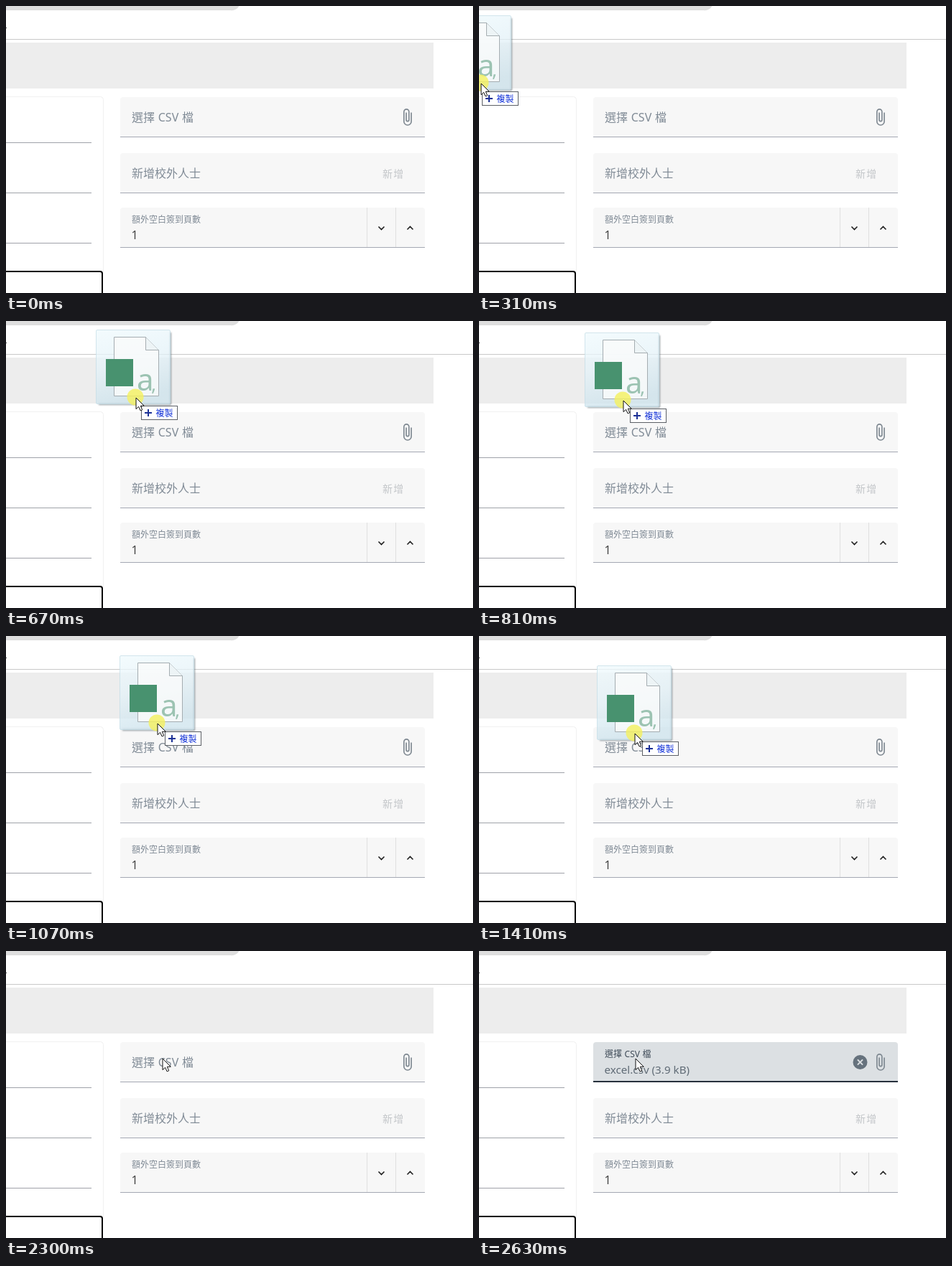
Recreate the animation shown at these times as an HTML page. Size 650 by 400 pixels, loop 3.05 s.

```html
<!DOCTYPE html>
<html lang="zh-Hant">
<head>
<meta charset="utf-8">
<title>CSV upload</title>
<style>
html, body { margin: 0; width: 100%; height: 100%; overflow: hidden; background: #fff; }
svg { display: block; width: 650px; height: 400px; }
text { font: 16px "Noto Sans", "Noto Sans CJK TC", "Noto Sans CJK", sans-serif; fill: #808b96; }
.small { font-size: 12px; }
.crisp { shape-rendering: crispEdges; }
</style>
</head>
<body>
<svg viewBox="0 0 650 400" xmlns="http://www.w3.org/2000/svg">
  <defs>
    <linearGradient id="tint" x1="0" y1="0" x2=".25" y2="1">
      <stop offset="0" stop-color="#f0fafd" stop-opacity=".78"/>
      <stop offset=".5" stop-color="#e4f2f8" stop-opacity=".75"/>
      <stop offset="1" stop-color="#cbe2ec" stop-opacity=".72"/>
    </linearGradient>
    <filter id="shade" x="-10%" y="-10%" width="125%" height="125%">
      <feGaussianBlur stdDeviation=".8"/>
    </filter>
    <path id="box" d="M0 56V4A4 4 0 0 1 4 0H420A4 4 0 0 1 424 4V56Z"/>
    <rect id="line" class="crisp" width="424" height="1" fill="#a4a8b3"/>
    <rect id="rule" class="crisp" width="119" height="1" fill="#9fa2a9"/>
  </defs>

  <!-- page -->
  <path d="M0 0H324.5A12.5 12.5 0 0 1 312 6H0Z" fill="#dedede"/>
  <rect class="crisp" y="30" width="1" height="1" fill="#333"/>
  <rect class="crisp" y="46" width="650" height="1" fill="#c9c9c9"/>
  <rect class="crisp" y="51" width="595" height="64" fill="#ededed"/>
  <path d="M0 126.5H131.5A4 4 0 0 1 135.5 130.5V370" fill="none" stroke="#f0f0f0"/>
  <use href="#rule" y="190"/>
  <use href="#rule" y="260"/>
  <use href="#rule" y="330"/>
  <path d="M-5 370H131A3 3 0 0 1 134 373V405" fill="#fff" stroke="#000" stroke-width="2"/>

  <!-- file field -->
  <use id="fileBox" href="#box" x="159" y="127" fill="#f7f7f7"/>
  <use href="#line" x="159" y="182"/>
  <rect id="bar" y="181" height="2" fill="#27313c"/>
  <text id="label" style="word-spacing:.6px">選擇 CSV 檔</text>
  <g id="chosen">
    <text x="174.5" y="171" style="font-size:15.2px;fill:#606b76">excel.csv (3.9 kB)</text>
    <circle cx="530.5" cy="155" r="10" fill="#66727d"/>
    <path d="M526.9 151.4l7.2 7.2m0-7.2l-7.2 7.2" stroke="#dce0e3" stroke-width="2"/>
  </g>
  <path transform="translate(545.5 142) scale(1.08)" fill="#7d8790" d="M16.5 6V17.5A4 4 0 0 1 8.5 17.5V5A2.5 2.5 0 0 1 13.5 5V15.5A1 1 0 0 1 11.5 15.5V6H10V15.5A2.5 2.5 0 0 0 15 15.5V5A4 4 0 0 0 7 5V17.5A5.5 5.5 0 0 0 18 17.5V6Z"/>

  <!-- person field -->
  <use href="#box" x="159" y="205" fill="#f7f7f7"/>
  <use href="#line" x="159" y="260"/>
  <text x="175" y="239">新增校外人士</text>
  <text x="524" y="239" style="font-size:14px;letter-spacing:1.2px;fill:#c3c6c9">新增</text>

  <!-- page count field -->
  <use href="#box" x="159" y="281" fill="#f7f7f7"/>
  <use href="#line" x="159" y="336"/>
  <path class="crisp" d="M502.5 281V336M542.5 281V336" stroke="#e0e0e0"/>
  <text class="small" x="175" y="302">額外空白簽到頁數</text>
  <text x="174.5" y="325" style="fill:#444">1</text>
  <path d="M518.5 307.5l4 4l4-4M558.5 311.5l4-4l4 4" fill="none" stroke="#222" stroke-width="1.6"/>

  <!-- dragged file -->
  <g id="drag">
    <path d="M104 4V104H4" fill="none" stroke="#65717a" stroke-opacity=".7" stroke-width="2" filter="url(#shade)"/>
    <rect x=".5" y=".5" width="103" height="103" rx="1.5" fill="url(#tint)" stroke="#c2dce6" stroke-opacity=".7"/>
    <path d="M25.5 10.5H69.5L87.5 28.5V92.5H25.5Z" fill="#fafcfc" fill-opacity=".82" stroke="#a5adb1"/>
    <path d="M69.5 10.5V28.5H87.5" fill="#edf4f6" stroke="#a5adb1"/>
    <rect x="14" y="41" width="38" height="38" fill="#48926f"/>
    <text x="57" y="85" style="font-size:42px;fill:#9cc3b2">a</text>
    <text x="77" y="85" style="font-size:27px;fill:#9cc3b2">,</text>
  </g>
  <circle id="halo" r="11.5" fill="#f4f060" fill-opacity=".82"/>
  <g id="tip">
    <rect x=".5" y=".5" width="50" height="19" fill="#fff" stroke="#5c6066"/>
    <path class="crisp" d="M5 10H15M10 5V15" stroke="#1c3196" stroke-width="2"/>
    <text class="small" x="20.5" y="14.5" style="fill:#1534d8">複製</text>
  </g>
  <path id="cursor" d="M.5 .5V16.2L4.1 12.8L6.6 18.4L9.2 17.3L6.8 11.8H11.8Z" fill="#fff" stroke="#111"/>
</svg>
<script>
const LOOP = 3050, STEP = 65, DROP = 2300, FILLED = 2630;

// resting points of the drag; lead is how far the cursor runs ahead
const stops = [
  { t: 250, x: -59, y: 13, lead: 9 },
  { t: 500, x: 100, y: 9, lead: 5 },
  { t: 810, x: 147, y: 16, lead: 1 },
  { t: 1070, x: 158, y: 27, lead: 0 },
  { t: 1410, x: 164, y: 41, lead: 0 },
  { t: 1800, x: 165, y: 55, lead: 0 }
];

const el = id => document.getElementById(id);
const [fileBox, bar, label, chosen, drag, halo, tip, cursor] =
  ["fileBox", "bar", "label", "chosen", "drag", "halo", "tip", "cursor"].map(el);
const mix = (a, b, p) => a + (b - a) * p;
const easeOut = (p, power) => 1 - (1 - p) ** power;
const blend = (a, b, p) => `rgb(${a.map((v, i) => Math.round(mix(v, b[i], p)))})`;
const place = (node, x, y) => node.setAttribute("transform", `translate(${x} ${y})`);
const show = (node, on) => node.setAttribute("visibility", on ? "visible" : "hidden");

// progress from a to b, in whole screen updates
function stepped(t, a, b) {
  const count = Math.round((b - a) / STEP);
  const p = Math.min(1, Math.max(0, (t - a) / (b - a)));
  return Math.floor(p * count) / count;
}

function dragPose(t) {
  const i = stops.findLastIndex(s => s.t <= t);
  if (i < 0) return null;
  const a = stops[i], b = stops[i + 1];
  if (!b) return a;
  const p = stepped(t, a.t, b.t);
  return {
    x: Math.round(mix(a.x, b.x, easeOut(p, 1.5))),
    y: Math.round(mix(a.y, b.y, p)),
    lead: Math.round(mix(a.lead, b.lead, p))
  };
}

function drawDrag(t) {
  const pose = dragPose(t);
  [drag, halo, tip].forEach(node => show(node, pose && t < DROP));
  show(cursor, pose);
  if (!pose) return;
  const { x, y, lead } = pose;
  const cx = x + 53 + lead, cy = y + 95;
  place(drag, x, y);
  place(tip, x + 63, y + 106);
  place(halo, cx - 1, cy - 1);
  place(cursor, cx - .5, cy - .5);
}

function drawField(t) {
  const p = easeOut(stepped(t, DROP, FILLED), 2);
  fileBox.setAttribute("fill", blend([247, 247, 247], [220, 224, 227], p));
  label.setAttribute("transform", `translate(175 ${mix(161, 148, p)}) scale(${mix(1, .75, p)})`);
  label.style.fill = blend([128, 139, 150], [62, 74, 87], p);
  bar.setAttribute("x", 371 - 212 * p);
  bar.setAttribute("width", 424 * p);
  chosen.setAttribute("opacity", p);
}

const start = performance.now();
function tick() {
  const t = (performance.now() - start) % LOOP;
  drawDrag(t);
  drawField(t);
  requestAnimationFrame(tick);
}
tick();
</script>
</body>
</html>
```
